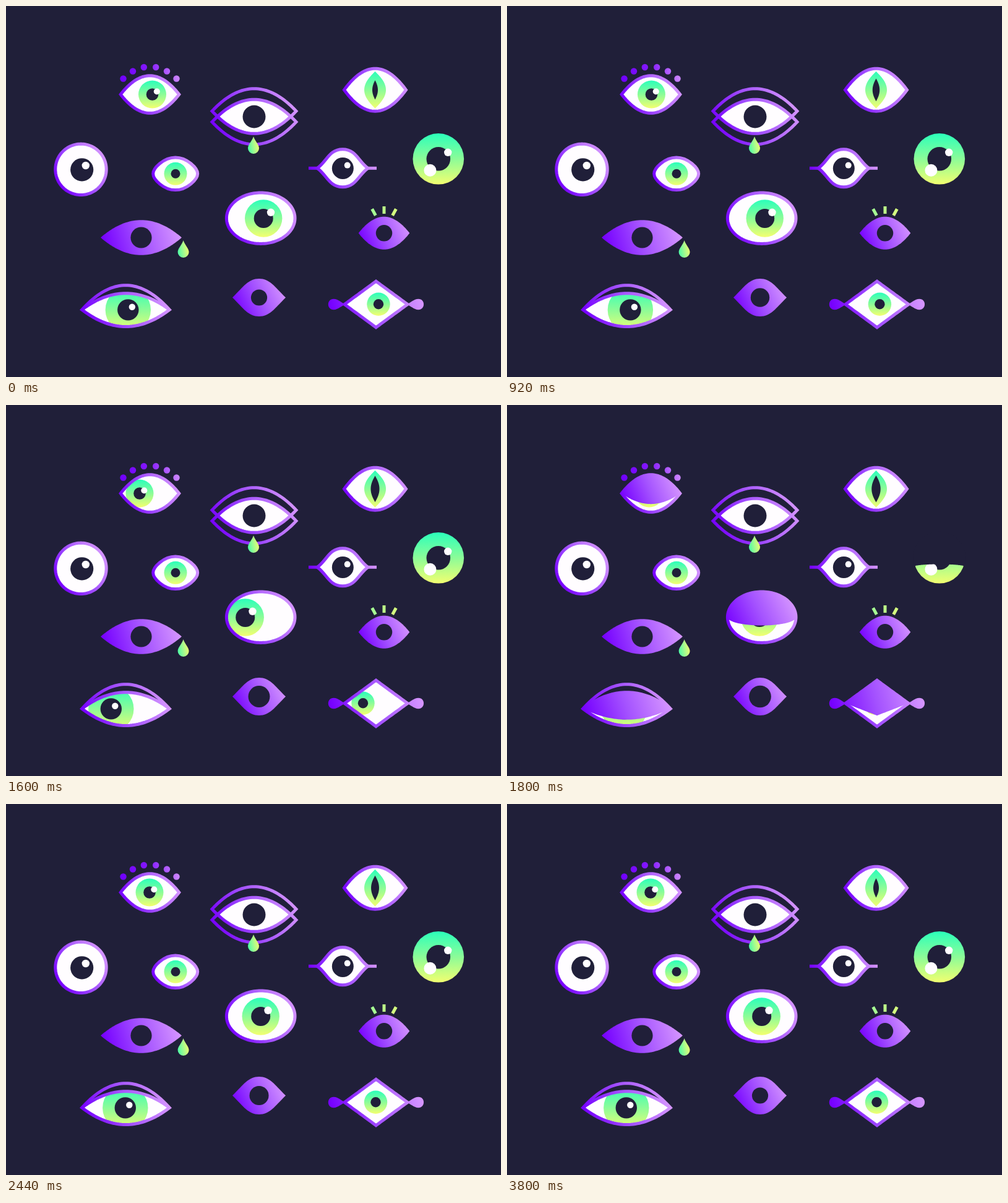
An HTML page with a canvas for the animation above (3.84 s loop, 800 by 600 pixels).

```html
<!DOCTYPE html>
<html lang="en">
<head>
<meta charset="utf-8">
<title>Eyes</title>
<style>
html, body { margin: 0; width: 100%; height: 100%; overflow: hidden; background: #201f39; }
canvas { display: block; width: 800px; height: 600px; }
</style>
</head>
<body>
<canvas id="stage" width="800" height="600"></canvas>
<script>
const ctx = document.getElementById('stage').getContext('2d');
const LOOP = 3840, STEP = 40, LINE = 5;
const DARK = '#201f39', WHITE = '#fffdff';

// Edge profiles: height over x in -1..1
const almond = x => 1 - x * x;
const round = x => Math.sqrt(Math.max(0, 1 - x * x));
const diamond = x => 1 - Math.abs(x);

const ease = (t, from, to) => {
  const u = Math.min(1, Math.max(0, (t - from) / (to - from)));
  return u * u * (3 - 2 * u);
};
const lerp = (a, b, u) => a + (b - a) * u;

function shape(profile, x, y, a, up, down = up, drop = 0) {
  const path = new Path2D(), n = 64;
  for (let i = 0; i <= n; i++) {
    const s = i === n / 2 ? 0 : -Math.cos(Math.PI * i / n);
    path.lineTo(x + a * s, y - up * profile(s));
  }
  for (let i = drop ? 0 : 1; i < (drop ? n + 1 : n); i++) {
    const s = i === n / 2 ? 0 : Math.cos(Math.PI * i / n);
    path.lineTo(x + a * s, y + drop + down * profile(s));
  }
  path.closePath();
  return path;
}

// Symmetric outline from one quarter: tip, two handles, top
function quarterShape(x, y, a, h, ax, ay, bx) {
  const path = new Path2D();
  path.moveTo(x - a, y);
  path.bezierCurveTo(x - ax, y - ay, x - bx, y - h, x, y - h);
  path.bezierCurveTo(x + bx, y - h, x + ax, y - ay, x + a, y);
  path.bezierCurveTo(x + ax, y + ay, x + bx, y + h, x, y + h);
  path.bezierCurveTo(x - bx, y + h, x - ax, y + ay, x - a, y);
  path.closePath();
  return path;
}

function gradient(x0, y0, x1, y1, ...colors) {
  const g = ctx.createLinearGradient(x0, y0, x1, y1);
  colors.forEach((c, i) => g.addColorStop(i / (colors.length - 1), c));
  return g;
}
const purple = (x, y, a, h) =>
  gradient(x - a * 0.9, y + h * 0.6, x + a * 0.9, y - h * 0.6, '#7600ff', '#a452ff', '#d494ff');
const green = (y, r) => gradient(0, y - r, 0, y + r, '#2bffba', '#8cfc98', '#f2ff70');

function fill(path, color) {
  ctx.fillStyle = color;
  ctx.fill(path);
}
function stroke(path, color) {
  ctx.strokeStyle = color;
  ctx.lineWidth = LINE;
  ctx.stroke(path);
}
function disc(x, y, r, color) {
  ctx.fillStyle = color;
  ctx.beginPath();
  ctx.arc(x, y, r, 0, Math.PI * 2);
  ctx.fill();
}
function clipped(path, draw) {
  ctx.save();
  ctx.clip(path);
  draw();
  ctx.restore();
}

function tear(x, top, bottom) {
  const r = 9, y = bottom - r, path = new Path2D();
  path.moveTo(x, top);
  path.bezierCurveTo(x + 2, top + 7, x + r, y - 6, x + r, y);
  path.arc(x, y, r, 0, Math.PI);
  path.bezierCurveTo(x - r, y - 6, x - 2, top + 7, x, top);
  fill(path, gradient(x - r, y, x + r, y - 3, '#4dfba6', '#a0fb90', '#ecff72'));
}

// Glance right, glance left, then settle slightly left of the start
function glance(t, reach, lag) {
  const back = ease(t, 1640, 1850);
  return reach * (ease(t, 0, 280) - 2 * ease(t, 740 + lag, 1100 + lag) + back) - 4.5 * back;
}
const lidClosed = (t, opens) => ease(t, 1670, opens - 10) - ease(t, opens, opens + 380);

function iris(x, y, r, pupil) {
  disc(x, y, r, green(y, r));
  disc(x, y, pupil, DARK);
}

function lid(profile, x, y, a, up, down, closed, color) {
  if (closed > 0) fill(shape(profile, x, y, a, up, lerp(-up, down, closed)), color);
}

function lashedEye(t) {
  const x = 232.5, y = 143, a = 47.3, h = 30.3, tint = purple(x, y, a, h);
  const body = shape(almond, x, y, a, h), ix = 236.5 + glance(t, 20.5, -18);
  const dots = gradient(185, 120, 281, 108, '#7000ff', '#8418ff', '#d08cff');
  [[43, 117.5], [27.5, 105.5], [9.7, 99]].forEach(([dx, dy]) => {
    disc(x - dx, dy, 5.2, dots);
    disc(x + dx, dy, 5.2, dots);
  });
  fill(body, WHITE);
  clipped(body, () => {
    iris(ix, y, 22.5, 9.8);
    disc(ix + 7.3, y - 4.7, 5, WHITE);
  });
  lid(almond, x, y, a, h, h, lidClosed(t, 1866), tint);
  stroke(body, tint);
}

function doubleEye() {
  const x = 401, a = 68, h = 36.3, tint = purple(x, 179, a, 46);
  const upper = shape(almond, x, 170, a, h), lower = shape(almond, x, 187.5, a, h);
  clipped(upper, () => fill(lower, WHITE));
  stroke(upper, tint);
  stroke(lower, tint);
  disc(x, 179, 18.5, DARK);
  tear(400, 211, 239);
}

function catEye(t) {
  const x = 596.5, y = 135.7, body = shape(almond, x, y, 50, 34.5);
  const wide = ease(t, 0, 2000) - ease(t, 2000, 3200);
  const upright = (a, h) => shape(s => Math.pow(almond(s), 1.1), 0, 0, a, h);
  fill(body, WHITE);
  stroke(body, purple(x, y, 50, 34));
  ctx.save();
  ctx.translate(x, y);
  ctx.rotate(Math.PI / 2);
  fill(upright(30, 17.5), gradient(-30, 0, 30, 0, '#2bffba', '#8cfc98', '#f2ff70'));
  fill(upright(lerp(15.7, 22, wide), lerp(4.5, 7.3, wide)), DARK);
  ctx.restore();
}

function roundEye() {
  const x = 121, y = 264.3, body = shape(round, x, y, 41.2, 41.2);
  fill(body, WHITE);
  stroke(body, purple(x, y, 41, 41));
  disc(122.7, 264.8, 18.6, DARK);
  disc(128.8, 258, 6.2, WHITE);
}

function smallEye() {
  const x = 273.7, y = 271.3, body = quarterShape(x, y, 36, 26.3, 36, 9, 19);
  fill(body, WHITE);
  stroke(body, purple(x, y, 36, 26));
  iris(x + 0.3, y, 18.5, 7.5);
}

function linedEye() {
  const x = 544, y = 262.3, tint = purple(x, y, 55, 30);
  const body = quarterShape(x, y, 41, 30.5, 26, 10, 22);
  ctx.fillStyle = tint;
  ctx.fillRect(489, y - 2.5, 14, 5);
  ctx.fillRect(585, y - 2.5, 14, 5);
  fill(body, WHITE);
  stroke(body, tint);
  disc(544.3, 262.5, 17.5, DARK);
  disc(551.7, 257.6, 5, WHITE);
}

function ringEye(t) {
  const x = 698.8, y = 247.3, closed = lidClosed(t, 1904);
  iris(x, y, 41.3, 19.3);
  disc(714.2, 236.8, 6.2, WHITE);
  disc(685.4, 265.8, 10, WHITE);
  if (closed > 0) {
    const drop = 100 * closed * closed * (1 - closed);
    fill(shape(round, x, y, 42.5, 42.5, lerp(-42.5, 42.5, closed) - drop, drop), DARK);
  }
}

function ovalEye(t) {
  const x = 411.7, y = 343.2, a = 55.3, h = 41.2, tint = purple(x, y, a, h);
  const body = shape(round, x, y, a, h), ix = 416.2 + glance(t, 29.5, 2);
  fill(body, WHITE);
  clipped(body, () => {
    iris(ix, y + 0.3, 30.2, 15.5);
    disc(ix + 11.8, y - 9.4, 6.2, WHITE);
  });
  lid(round, x, y, a, h, h, lidClosed(t, 1893), tint);
  stroke(body, tint);
}

function cryingEye() {
  const x = 218.5, y = 374.5;
  fill(shape(almond, x, y, 65.5, 28.3), purple(x, y, 65, 28));
  disc(x, y, 17.1, DARK);
  tear(286.6, 379, 407);
}

function barEye() {
  const x = 611, y = 367.3;
  fill(shape(almond, x, y, 41.3, 26.5), purple(x, y, 41, 26));
  disc(x, y, 13.2, DARK);
  [[-16.5, 333.5, '#a6fb92'], [0, 330, '#bcfa88'], [16.5, 333.5, '#d4fc80']].forEach(([dx, dy, color]) => {
    ctx.save();
    ctx.translate(x + dx, dy);
    ctx.rotate(dx * 0.03);
    ctx.fillStyle = color;
    ctx.fillRect(-2.5, -6, 5, 12);
    ctx.restore();
  });
}

function creasedEye(t) {
  const x = 193.5, y = 491.2, a = 70.8, up = 26.5, down = 27.3, tint = purple(x, y, a, 36);
  const body = shape(almond, x, y, a, up, down), outer = shape(almond, x, y, a, 39.5, down);
  const ix = 197.3 + glance(t, 27.5, 9);
  fill(body, WHITE);
  clipped(body, () => {
    iris(ix, y + 0.2, 36.7, 17.2);
    disc(ix + 6.5, y - 4.4, 5.2, WHITE);
  });
  lid(almond, x, y, a, up, down, lidClosed(t, 1858), tint);
  clipped(outer, () => stroke(body, tint));
  stroke(outer, tint);
}

function lemonEye(t) {
  const x = 409, y = 471.5, wide = ease(t, 0, 2000) - ease(t, 2000, 2880);
  fill(quarterShape(x, y, 43, 30.5, 25, 18, 17), purple(x, y, 43, 30));
  disc(x, y, lerp(13.1, 18, wide), DARK);
}

function diamondEye(t) {
  const x = 598, y = 482.5, a = 51, h = 37.3, tint = purple(x, y, 77, 30);
  const body = shape(diamond, x, y, a, h);
  [-1, 1].forEach(side => {
    const at = d => x + side * d, drop = new Path2D();
    drop.moveTo(at(49), y);
    drop.bezierCurveTo(at(56), y - 2, at(61), y - 8.7, at(68.5), y - 8.7);
    drop.bezierCurveTo(at(80), y - 8.7, at(80), y + 8.7, at(68.5), y + 8.7);
    drop.bezierCurveTo(at(61), y + 8.7, at(56), y + 2, at(49), y);
    fill(drop, tint);
  });
  fill(body, WHITE);
  clipped(body, () => iris(602 + glance(t, 25, 2), y - 0.2, 18.7, 8.2));
  lid(diamond, x, y, a, h, h, lidClosed(t, 1870), tint);
  stroke(body, tint);
}

const eyes = [lashedEye, doubleEye, catEye, roundEye, smallEye, linedEye, ringEye,
  ovalEye, cryingEye, barEye, creasedEye, lemonEye, diamondEye];

function render(now) {
  const t = Math.floor((now % LOOP) / STEP) * STEP;
  ctx.fillStyle = DARK;
  ctx.fillRect(0, 0, 800, 600);
  eyes.forEach(draw => draw(t));
}

const start = performance.now();
function tick() {
  render(performance.now() - start);
  requestAnimationFrame(tick);
}
tick();
</script>
</body>
</html>
```
